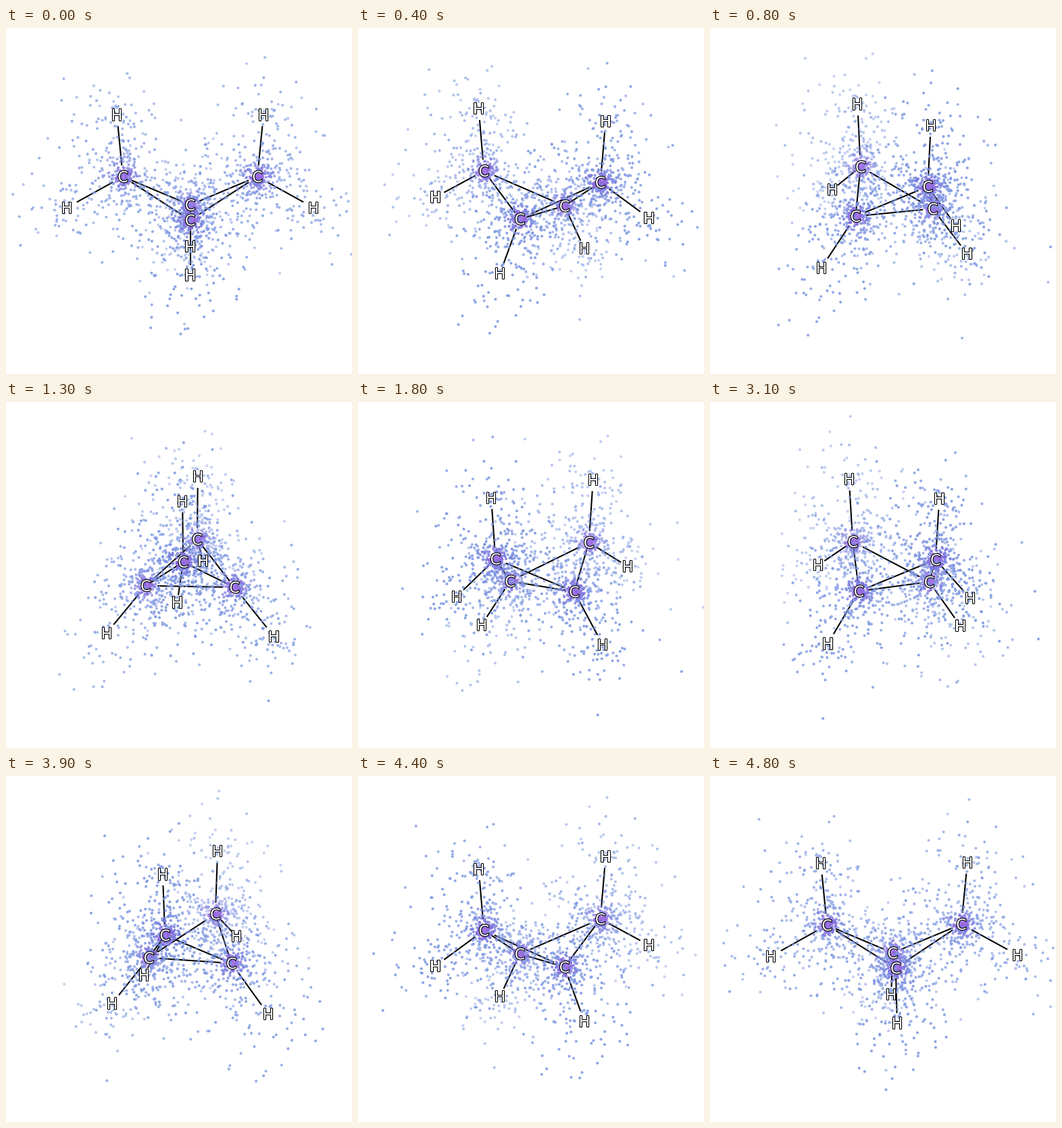
Recreate the animation shown at these times as a matplotlib script. Size 512 px wide and 512 px high, loop 4.9 s.

```python
import matplotlib.pyplot as plt
import numpy as np
from matplotlib.animation import FuncAnimation
from matplotlib.collections import LineCollection
from matplotlib.colors import LinearSegmentedColormap
from matplotlib.patheffects import withStroke

SIZE, DPI = 512, 100
FRAMES, INTERVAL = 49, 100
POSES = 180                        # the turn moves in whole steps of 2 degrees
AXIS_X, SHIFT_Y = 272.5, -1
SIN_E, COS_E = 0.17, 0.985         # camera elevation
GAP = 17                           # free space at each end of a bond

# Bicyclobutane: x to the right, screen height at zero depth, depth to viewer
ATOMS = [
    ("C", -99.5, 221.0, 0), ("C", 99.5, 221.0, 0),
    ("C", 0, 274.0, 66), ("C", 0, 274.0, -66),
    ("H", -108.5, 129.5, 0), ("H", 108.5, 129.5, 0),
    ("H", -182.5, 266.8, 0), ("H", 182.5, 266.8, 0),
    ("H", 0, 345.5, 124.5), ("H", 0, 345.5, -124.5),
]
BONDS = [(0, 2), (0, 3), (1, 2), (1, 3), (2, 3),
         (0, 4), (1, 5), (0, 6), (1, 7), (2, 8), (3, 9)]
SYMBOLS = [a[0] for a in ATOMS]
REST = np.array([a[1:] for a in ATOMS], float)
REST[:, 1] /= COS_E
CARBONS = [i for i, s in enumerate(SYMBOLS) if s == "C"]

CLOUD = LinearSegmentedColormap.from_list("cloud", [
    (0, "#829de2"), (0.15, "#7d93e2"), (0.35, "#7a72de"),
    (0.6, "#9468dc"), (0.8, "#b678ee"), (1, "#cf8cfa")])


def pose_angle(k):
    step = min(k * POSES // (FRAMES - 1), POSES - 1)
    return 2 * np.pi * step / POSES


def rotate(points, angle):
    x, y, d = points.T
    c, s = np.cos(angle), np.sin(angle)
    return np.column_stack([x * c - d * s, y, x * s + d * c])


def project(points):
    x, y, d = points.T
    return np.column_stack([AXIS_X + x, y * COS_E + d * SIN_E + SHIFT_Y])


def shell(rng, n, scale):
    """Offsets with an exponentially decaying density."""
    v = rng.normal(size=(n, 3))
    v /= np.linalg.norm(v, axis=1, keepdims=True)
    return v * np.minimum(rng.gamma(3, scale, (n, 1)), 7.5 * scale)


def build_cloud():
    rng = np.random.default_rng(11)
    owners, offsets = [], []
    for i, symbol in enumerate(SYMBOLS):
        shells = [(120, 3.2), (235, 18)] if symbol == "C" else [(50, 18)]
        for n, scale in shells:
            owners.append(np.full(n, i))
            offsets.append(shell(rng, n, scale))
    return np.concatenate(owners), np.vstack(offsets)


OWNER, OFFSET = build_cloud()

fig = plt.figure(figsize=(SIZE / DPI, SIZE / DPI), dpi=DPI, facecolor="white")
ax = fig.add_axes([0, 0, 1, 1])
ax.set(xlim=(0, SIZE), ylim=(SIZE, 0))
ax.axis("off")

bonds = LineCollection([], colors="black", linewidths=1.5, capstyle="butt", zorder=1)
ax.add_collection(bonds)
dots = ax.scatter([], [], s=8.5, linewidths=0, zorder=2)
labels = [ax.text(0, 0, s, color="white", fontsize=16, family="DejaVu Sans",
                  ha="center", va="center_baseline",
                  path_effects=[withStroke(linewidth=1.6, foreground="black")])
          for s in SYMBOLS]


def bond_ends(atoms, i, j):
    a, b = atoms[i], atoms[j]
    inset = (b - a) * GAP / np.linalg.norm(b - a)
    return project(np.array([a + inset, b - inset]))


def draw_cloud(atoms, k):
    # the cloud is re-sampled a little for every pose
    rng = np.random.default_rng(100 + k)
    pts = atoms[OWNER] + OFFSET * (1 + 0.1 * rng.normal(size=OFFSET.shape))
    pts = pts[np.argsort(pts[:, 2])]
    near = np.linalg.norm(pts[:, None] - atoms[CARBONS], axis=2).min(axis=1)
    rgba = CLOUD(np.exp(-near / 16))
    rgba[:, 3] = np.clip(0.72 + pts[:, 2] / 500, 0.45, 0.92)
    dots.set_offsets(project(pts))
    dots.set_facecolors(rgba)


def update(k):
    atoms = rotate(REST, pose_angle(k))
    bonds.set_segments([bond_ends(atoms, i, j) for i, j in BONDS])
    draw_cloud(atoms, k)
    for label, pos, depth in zip(labels, project(atoms), atoms[:, 2]):
        label.set_position(pos)
        label.set_zorder(4 + depth / 1000)
    return [bonds, dots, *labels]


anim = FuncAnimation(fig, update, frames=FRAMES, interval=INTERVAL,
                     repeat=True, repeat_delay=0, blit=False)
plt.show()
```
